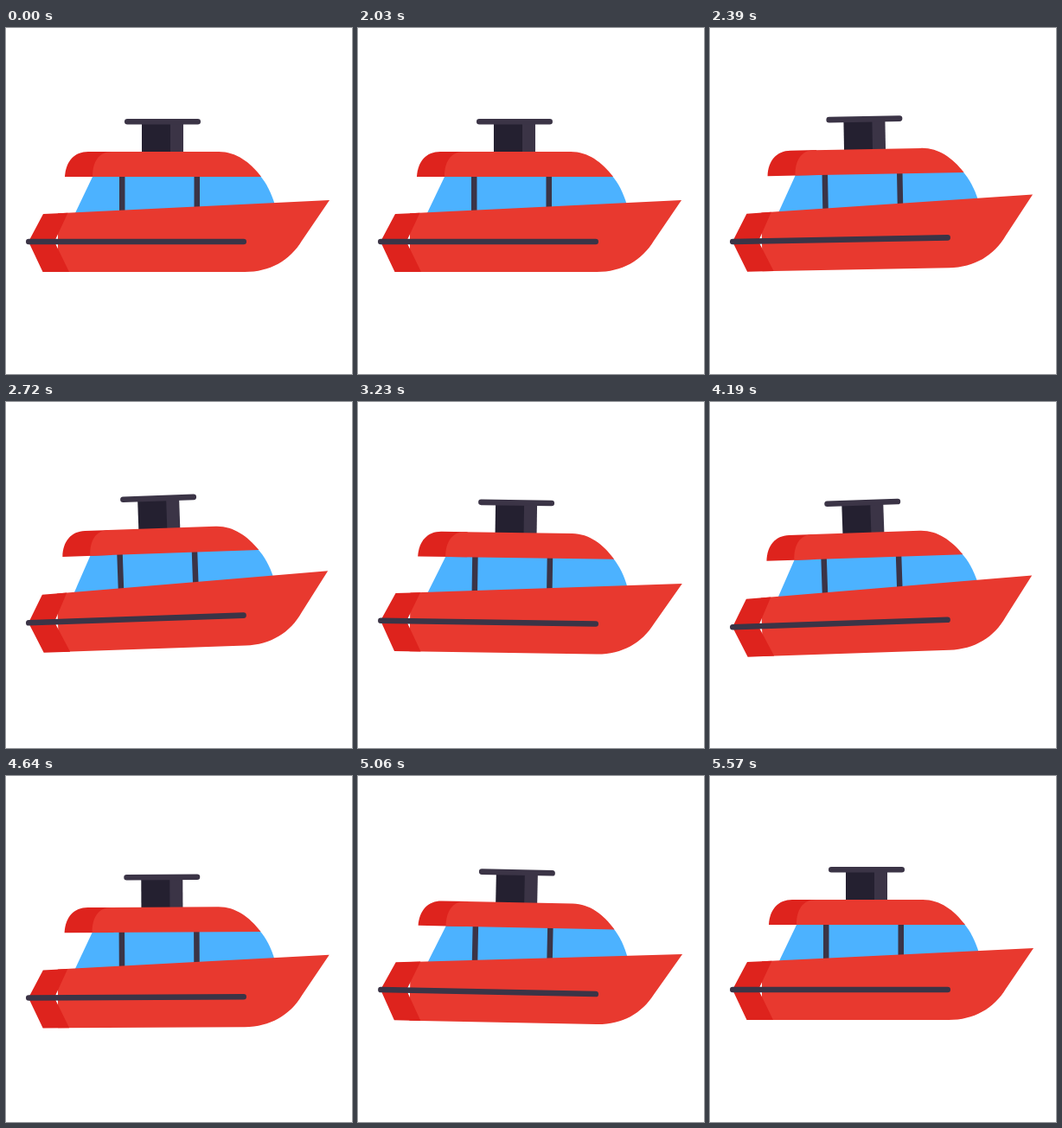
An HTML page with a canvas that plays this animation: 400x400 px, repeating every 5.6 s.

```html
<!DOCTYPE html>
<html lang="en">
<head>
<meta charset="utf-8">
<title>Rocking boat</title>
<style>
html, body { margin: 0; width: 100%; height: 100%; overflow: hidden; background: #fff; }
canvas { display: block; width: 100vmin; height: 100vmin; }
</style>
</head>
<body>
<canvas id="stage" width="400" height="400"></canvas>
<script>
const ctx = document.getElementById('stage').getContext('2d');
const LOOP = 5600, HOLD = 2000, STEP = 30;
const PIVOT = { x: 200, y: 250 };
const RED = '#e8392f', DEEP_RED = '#de231d', BLUE = '#4cb2ff';
const SLATE = '#3b3446', INK = '#242030';

// Keys are [step, value]; the value eases in and out between them.
const TILT = [[0, 0], [25, -2], [50, 2], [75, -2], [100, 1.2], [120, 0]];
const HEAVE = [[0, 0], [12.5, -3.3], [37, 9], [61, 0], [79, 9.8], [118, 0]];

function sample(keys, step) {
  for (let i = 1; i < keys.length; i++) {
    const [start, from] = keys[i - 1], [end, to] = keys[i];
    if (step <= end) {
      const u = (step - start) / (end - start);
      return from + (to - from) * (1 - Math.cos(Math.PI * u)) / 2;
    }
  }
  return keys[keys.length - 1][1];
}

function fill(color, path) {
  ctx.fillStyle = color;
  ctx.fill(new Path2D(path));
}

function bar(x1, x2, y) {
  ctx.strokeStyle = SLATE;
  ctx.lineWidth = 6.6;
  ctx.lineCap = 'round';
  ctx.beginPath();
  ctx.moveTo(x1, y);
  ctx.lineTo(x2, y);
  ctx.stroke();
}

function drawBoat() {
  // Funnel
  fill(INK, 'M157 108H191V145H157Z');
  fill(SLATE, 'M190 108H205V145H190Z');
  bar(140.3, 221.7, 108.3);

  // Cabin
  fill(BLUE, 'M101 170H293C301 179 307 191 311 205L79 216Z');
  fill(SLATE, 'M131 170H137.5V215H131ZM217.5 170H224V211H217.5Z');
  fill(DEEP_RED, 'M68 172C69 154 79 143 95 143H125V172Z');
  fill(RED, 'M100 172C100 155 107 143 122 143H246C266 143 282 155 295 172Z');

  // Hull
  fill(RED, 'M60 214.3L374 199L342 246C328 269 305 282 276 282H60Z');
  fill(DEEP_RED, 'M43 215L71.5 213.7L56 247L73 282H42.5L26 247Z');
  bar(26.3, 274.7, 247);
}

function render(time) {
  const step = Math.max(0, Math.floor((time % LOOP - HOLD) / STEP));
  ctx.fillStyle = '#fff';
  ctx.fillRect(0, 0, 400, 400);
  ctx.save();
  ctx.translate(PIVOT.x, PIVOT.y + sample(HEAVE, step));
  ctx.rotate(sample(TILT, step) * Math.PI / 180);
  ctx.translate(-PIVOT.x, -PIVOT.y);
  drawBoat();
  ctx.restore();
}

let origin;
function tick(now) {
  origin ??= now;
  render(now - origin);
  requestAnimationFrame(tick);
}
render(0);
requestAnimationFrame(tick);
</script>
</body>
</html>
```
